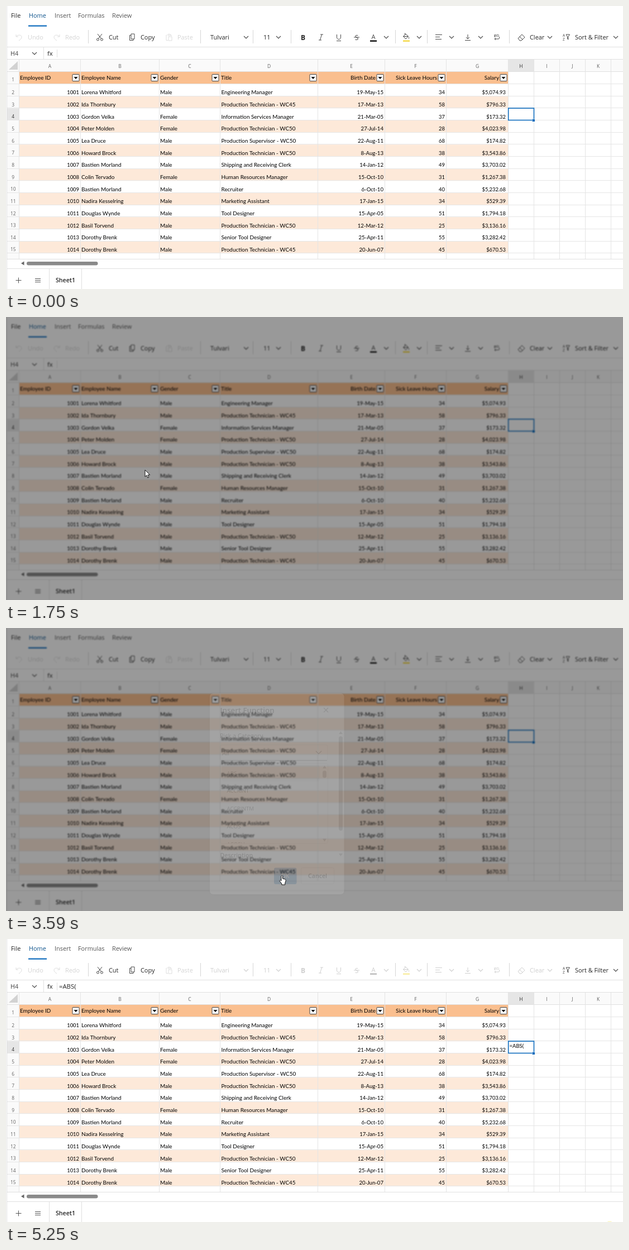
An HTML page with a canvas that plays this animation: 1105 px wide and 507 px high, repeating every 5320 ms.

```html
<!DOCTYPE html>
<html lang="en">
<head>
<meta charset="utf-8">
<title>Insert function</title>
<style>
html, body { margin: 0; width: 100%; height: 100%; overflow: hidden; background: #fff; }
canvas { display: block; }
</style>
</head>
<body>
<canvas id="stage" width="1105" height="507"></canvas>
<script>
const W = 1105, H = 507, LOOP = 5320;
const UI = '"Open Sans", "Noto Sans", sans-serif';
const CELL = 'Lato, sans-serif';
const BLUE = '#0f6cbd', INK = '#242424', GRAY = '#8a8a8a', LINE = '#e0e0e0', OFF = '#cfcfcf';

const screen = document.getElementById('stage').getContext('2d');
let c = screen;

function rect(x, y, w, h, color) {
  c.fillStyle = color;
  c.fillRect(x, y, w, h);
}
function round(x, y, w, h, r, fill, stroke) {
  c.beginPath();
  c.roundRect(x, y, w, h, r);
  if (fill) { c.fillStyle = fill; c.fill(); }
  if (stroke) { c.strokeStyle = stroke; c.lineWidth = 1; c.stroke(); }
}
function text(s, x, y, font, color = INK, align = 'left') {
  c.font = font;
  c.fillStyle = color;
  c.textAlign = align;
  c.fillText(s, x, y);
}
const ui = (s, x, y, color, size = 10.9, align) => text(s, x, y, size + 'px ' + UI, color, align);
const semi = (s, x, y, color, size = 10.6, align) => text(s, x, y, '600 ' + size + 'px ' + UI, color, align);
const cell = (s, x, y, align, size = 9.92) => text(s, x, y, size + 'px ' + CELL, '#000', align);

function icon(x, y, d, stroke, width = 1, fill) {
  const p = new Path2D(d);
  c.save();
  c.translate(x, y);
  if (fill) { c.fillStyle = fill; c.fill(p); }
  if (stroke) { c.strokeStyle = stroke; c.lineWidth = width; c.stroke(p); }
  c.restore();
}
const chevron = (x, y, color) => icon(x, y, 'M-4-2L0 2L4-2', color, 1.1);
const triangle = (x, y, up) => icon(x, y, up ? 'M-3.5 2.5H3.5L0-2.5Z' : 'M-3.5-2.5H3.5L0 2.5Z', null, 0, GRAY);

const COLS = [23, 133, 274, 383, 558, 678, 788, 899, 945, 991, 1037, 1083];
const HEADS = ['Employee ID', 'Employee Name', 'Gender', 'Title', 'Birth Date', 'Sick Leave Hours', 'Salary'];
const TECH = 'Production Technician - WC';
const STAFF = [
  'Lorena Whitford|Male|Engineering Manager|19-May-15|34|$5,074.93',
  'Ida Thornbury|Male|' + TECH + '45|17-Mar-13|58|$796.33',
  'Gordon Velka|Female|Information Services Manager|21-Mar-05|37|$173.32',
  'Peter Molden|Female|' + TECH + '50|27-Jul-14|28|$4,023.98',
  'Lea Druce|Male|Production Supervisor - WC50|22-Aug-11|68|$174.82',
  'Howard Brock|Male|' + TECH + '50|8-Aug-13|38|$3,543.86',
  'Bastien Morland|Male|Shipping and Receiving Clerk|14-Jan-12|49|$3,703.02',
  'Colin Tervado|Female|Human Resources Manager|15-Oct-10|31|$1,267.38',
  'Bastien Morland|Male|Recruiter|6-Oct-10|40|$5,232.68',
  'Nadira Kesselring|Male|Marketing Assistant|17-Jan-15|34|$529.39',
  'Douglas Wynde|Male|Tool Designer|15-Apr-05|51|$1,794.18',
  'Basil Torvend|Male|' + TECH + '50|12-Mar-12|25|$3,136.16',
  'Dorothy Brenk|Male|Senior Tool Designer|25-Apr-11|55|$3,282.42',
  'Dorothy Brenk|Male|' + TECH + '45|20-Jun-07|45|$670.53'
].map(s => s.split('|'));
const rowEnd = r => 205 + (r - 4) * 21.65;

function drawRibbon(editing) {
  ui('File', 9, 21, INK);
  ui('Home', 41, 21, '#0f548c');
  ui('Insert', 87, 21, '#555');
  ui('Formulas', 129, 21, '#555');
  ui('Review', 190, 21, '#555');
  rect(40, 34.5, 33, 2.2, BLUE);

  const on = '#484848', mid = editing ? OFF : on, ink = editing ? OFF : INK;
  icon(23, 56, 'M-5-5V-1H-1M-5-1C-2-5 5-5 5 0C5 2 3 4 0 6', '#dedede');
  ui('Undo', 39, 60, '#d4d4d4');
  icon(91, 56, 'M5-5V-1H1M5-1C2-5-5-5-5 0C-5 2-3 4 0 6', '#dedede');
  ui('Redo', 106, 60, '#d4d4d4');
  icon(168, 56, 'M-4-6L3 3M4-6L-3 3M-1.5 4a2 2 0 1 1-4 0a2 2 0 1 1 4 0M5.5 4a2 2 0 1 1-4 0a2 2 0 1 1 4 0', on);
  ui('Cut', 184, 60);
  icon(226, 56, 'M-2-6H4V3H-2ZM-2-3.5H-4.5V5.5H2V3', on);
  ui('Copy', 241, 60);
  icon(292, 56, 'M-4-4H-5V5.5H-2M-2-5.5H2V-3H-2ZM2-4H4V-2M-1-1H5V6H-1Z', '#dedede');
  ui('Paste', 307, 60, '#d4d4d4');
  ui('Tulvari', 366, 60, ink);
  ui('11', 461, 60, ink);
  text('B', 532, 60.5, '700 12px ' + UI, ink, 'center');
  icon(564, 56, 'M-1-5H4M-4 5H1M1.5-5L-1.5 5', mid);
  icon(596, 56, 'M-3.5-5V0C-3.5 5 3.5 5 3.5 0V-5M-4 6.5H4', mid);
  ui('S', 628, 60.5, mid, 12, 'center');
  rect(623, 55.5, 10, 1, mid);
  ui('A', 658, 59, mid, 11, 'center');
  rect(652, 61.5, 12, 2.3, editing ? '#b8b8b8' : '#000');
  icon(716, 54.5, 'M-4.5 0L0-4.5L4.5 0L0 4.5ZM-1.5-6V-3M-4.5 0H4.5M5.5 1.5V4', mid);
  rect(711, 61.5, 12, 2.3, editing ? '#f8ec9a' : '#f3d63b');
  icon(775, 56, 'M-6-4.5H6M-6-.5H2M-6 3.5H5', mid);
  icon(827, 56, 'M0-5V3M-3 0L0 3L3 0M-5 5.5H5', mid);
  ui('ab', 875, 55, mid, 7);
  icon(879, 56, 'M-4-5V0M-4 3H3C5 3 5 0 4-1M-2 1L-4 3L-2 5', mid);
  icon(923, 56, 'M-6 2L1-5L6 0L0 6H-3ZM-3-1L2 4', mid);
  ui('Clear', 938, 60, ink);
  ui('A', 997, 55, on, 6.5);
  ui('Z', 997, 61.5, on, 6.5);
  icon(1003, 56, 'M0-5H6.5L4-1V4L2.5 3V-1Z', on);
  ui('Sort & Filter', 1019, 60);
  for (const x of [430, 488, 681, 740, 798, 850, 974]) chevron(x, 56, mid);
  chevron(1092, 56, on);
  for (const x of [147, 348, 442, 510, 697, 754, 901]) rect(x, 43, 1, 24, '#d6d6d6');

  rect(2, 73, W, 1, LINE);
  ui('H4', 8, 89, '#424242', 10.7);
  chevron(51, 85, on);
  rect(67, 74, 1, 21, LINE);
  ui('fx', 74, 89, INK, 11.3);
  rect(91, 78, 1, 14, LINE);
  if (editing) ui('=ABS(', 95, 89, INK, 11.3);
}

function drawGrid(editing) {
  rect(2, 95, W, 22, '#fafafa');
  rect(2, 95, 21, 358, '#fafafa');
  rect(899, 96, 46, 21, '#e6e6e6');
  rect(2, rowEnd(3), 21, 21.6, '#e6e6e6');
  icon(21, 114, 'M0 0H-16L0-15Z', null, 0, '#d2d2d2');
  rect(23, 117, 876, rowEnd(1) - 117, '#fabf8f');
  for (let r = 3; r < 16; r += 2) rect(23, rowEnd(r - 1), 876, 21.65, '#fde9d9');

  rect(2, 95, W, 1, LINE);
  rect(2, 117, W, 1, LINE);
  for (let r = 1; r < 16; r++) rect(2, Math.round(rowEnd(r)) - 1, W, 1, '#e6e6e6');
  COLS.forEach((x, i) => {
    rect(x, 96, 1, 357, '#e4e4e4');
    if (i < 11) ui('ABCDEFGHIJK'[i], (x + COLS[i + 1]) / 2 + .5, 111, i === 7 ? '#333' : '#616161', 8.5, 'center');
  });
  for (let r = 1; r < 16; r++) {
    ui(String(r), 12.7, r === 1 ? 135 : rowEnd(r) - 3.7, r === 4 ? '#333' : '#616161', 8.4, 'center');
  }

  HEADS.forEach((s, i) => {
    const end = COLS[i + 1] - 8;
    if (i < 4) cell(s, COLS[i] + 2, 132, 'left');
    else cell(s, end - 8, 132, 'right');
    round(end - 6, 122.5, 12, 12, 1, '#fff', '#444');
    icon(end, 129, 'M-3.5-2H3.5L0 2Z', null, 0, '#000');
  });
  STAFF.forEach(([name, sex, job, born, hours, pay], i) => {
    const y = rowEnd(i + 2) - 3.3;
    cell(1001 + i, 131, y, 'right', 9.4);
    cell(name, 135, y, 'left');
    cell(sex, 276, y, 'left');
    cell(job, 385.5, y, 'left');
    cell(born, 676, y, 'right', 9.6);
    cell(hours, 786, y, 'right', 9.4);
    cell(pay, 895, y, 'right', 9.4);
  });

  c.strokeStyle = BLUE;
  c.lineWidth = 1.6;
  c.strokeRect(899.7, 183.1, 45.8, 21.4);
  rect(942, 202, 5, 5, '#fff');
  rect(942.6, 202.6, 4.4, 4.4, BLUE);
  if (editing) cell('=ABS(', 901.5, 195, 'left', 9.5);
}

function drawFooter() {
  rect(2, 453, W, 60, '#fff');
  rect(2, 453, W, 1, LINE);
  icon(30, 461, 'M2.5-3.5V3.5L-3 0Z', null, 0, '#666');
  round(37, 458, 127.5, 6.5, 3.2, GRAY);
  rect(2, 470, W, 1, LINE);
  rect(77, 471, 1, 36, LINE);
  rect(135, 471, 1, 36, LINE);
  icon(22.5, 491.5, 'M-5 0H5M0-5V5', '#555');
  icon(57, 492, 'M-5-3.5H5M-5-.5H5M-5 2.5H5', '#555');
  semi('Sheet1', 89, 495);
}

// Paints on an offscreen canvas, so that the result can be reused or faded as one.
function layer(paint) {
  const canvas = document.createElement('canvas');
  canvas.width = W;
  canvas.height = H;
  c = canvas.getContext('2d');
  paint();
  c = screen;
  return canvas;
}
const sheet = editing => layer(() => {
  rect(0, 0, W, H, '#fff');
  drawRibbon(editing);
  drawGrid(editing);
  drawFooter();
  rect(1, 0, 1, H, LINE);
});
const idle = sheet(false);
const edited = sheet(true);
const dimmed = layer(() => {
  rect(0, 0, W, H, '#fff');
  c.filter = 'blur(1.15px)';
  c.drawImage(idle, 0, 0);
  c.filter = 'none';
  rect(0, 0, W, H, 'rgba(0,0,0,.4)');
});

const ITEMS = ['ABS', 'ACCRINT', 'ACCRINTM', 'ACOS', 'ACOSH'];
const itemTop = i => 245.5 + i * 31.8;
const inside = (p, x, y, w, h) => p && p[0] >= x && p[0] < x + w && p[1] >= y && p[1] < y + h;

function drawDialog(chosen, pointer) {
  c.shadowColor = 'rgba(0,0,0,.16)';
  c.shadowBlur = 8;
  round(365, 117, 240.5, 360, 6, '#fafafa');
  c.shadowColor = 'transparent';
  semi('Insert Function', 383.5, 152, INK, 13.3);
  icon(573, 147, 'M-4-4L4 4M4-4L-4 4', '#555', 1.1);
  ui('Pick a Category', 383, 197);
  round(383.5, 209.5, 192.5, 28, 3, '#fff', '#d6d6d6');
  rect(385, 236.7, 190, 1, '#616161');
  ui('All', 387, 227.5);
  icon(560, 223, 'M-5-2.5L0 2.5L5-2.5', '#555', 1.1);

  round(383.5, 242.5, 193, 143.5, 3, '#fcfcfc', '#d6d6d6');
  c.save();
  c.beginPath();
  c.rect(384, 243, 192, 142.5);
  c.clip();
  ITEMS.forEach((s, i) => {
    const y = itemTop(i);
    const hover = inside(pointer, 387, y, 175, 29);
    if (chosen && i === 0) round(387, y, 175, 29, 3, '#e3e3e3');
    else if (hover) round(387, y, 175, 29, 3, '#f0f0f0');
    ui(s, 395.5, y + 18, INK, 9.8);
  });
  c.restore();
  triangle(570.5, 249, true);
  round(567, 255.5, 7, 13, 3.5, GRAY);
  triangle(570.5, 380);

  c.save();
  c.beginPath();
  c.rect(380, 395, 200, 16);
  c.clip();
  semi('Description', 383.5, 411);
  c.restore();
  triangle(599.5, 187.5, true);
  round(596, 194, 7, chosen ? 169 : 192.5, 3.5, GRAY);
  triangle(599.5, 406.5);

  if (chosen) round(480, 429.5, 40.5, 29.5, 3, BLUE);
  semi('OK', 500, 448, chosen ? '#fff' : '#c4c0ba', 10.6, 'center');
  round(528.5, 429.5, 59, 29, 3, '#fff', '#d1d1d1');
  semi('Cancel', 558, 448, INK, 10.6, 'center');
}

// Pointer route: time, x, y.
const ROUTE = [
  [0, 1085, 512], [120, 1041, 461], [600, 777, 190], [1070, 72, 49], [1150, 76, 64],
  [1290, 79, 85], [1430, 80, 87], [1750, 249, 274], [1885, 244, 323],
  [2150, 604, 330], [2410, 480, 242], [2620, 389, 256], [2760, 400, 262], [2960, 478, 377],
  [3200, 497, 442], [3450, 498, 444], [3652, 493, 444], [4050, 581, 446], [4560, 760, 520]
];
// Speed at a point; zero where the direction turns, so that the route never overshoots.
function speed(i, axis) {
  const [p, q, r] = [ROUTE[i - 1], ROUTE[i], ROUTE[i + 1]];
  if (!p || !r) return 0;
  const a = (q[axis] - p[axis]) / (q[0] - p[0]), b = (r[axis] - q[axis]) / (r[0] - q[0]);
  return a * b > 0 ? 2 * a * b / (a + b) : 0;
}
function pointerAt(t) {
  const i = ROUTE.findIndex(p => p[0] > t);
  if (i < 1) return null;
  const p = ROUTE[i - 1], q = ROUTE[i], span = q[0] - p[0], k = (t - p[0]) / span;
  const ease = k * k * (3 - 2 * k);
  return [1, 2].map(axis => p[axis] + (q[axis] - p[axis]) * ease +
    span * k * (1 - k) * (speed(i - 1, axis) * (1 - k) - speed(i, axis) * k));
}

const SHAPES = {
  arrow: 'M0 0V12.2L2.9 9.6L4.8 14L6.8 13.1L4.9 8.9H8.8Z',
  cross: 'M-1.6-5.5H1.6V-1.6H5.5V1.6H1.6V5.5H-1.6V1.6H-5.5V-1.6H-1.6Z',
  hand: 'M-1.3 9V1C-1.3-1 1.3-1 1.3 1V5L5.5 6C7 6.5 7 8 6.6 10L5.5 13V16H-.5V14L-4 9.5C-4.5 8-3 7-2.2 8Z'
};
function drawPointer(p, modal, chosen) {
  let kind = 'arrow';
  if (modal) {
    const link = inside(p, 387, 245, 175, 141) || inside(p, 528, 429, 59, 30) ||
      chosen && inside(p, 480, 429, 41, 30);
    if (link) kind = 'hand';
  } else if (inside(p, 24, 118, W, 335)) kind = 'cross';
  icon(p[0], p[1], SHAPES[kind], '#111', 1, '#fff');
}

// The picture advances in short bursts of steps: first, last, count.
const BURSTS = [
  [120, 600, 8], [670, 1150, 8], [1220, 1750, 8], [1820, 2340, 9], [2410, 2900, 7],
  [2960, 3450, 7], [3520, 4050, 9], [4120, 4590, 8], [5120, 5250, 2]
];
function snap(t) {
  let s = 0;
  for (const [a, b, n] of BURSTS) {
    for (let i = 0; i < n; i++) {
      const step = a + (b - a) * i / (n - 1);
      if (step <= t + 8) s = step;
    }
  }
  return s;
}

const clamp = v => Math.max(0, Math.min(1, v));

function draw(t) {
  const modal = t >= 1745 && t < 3640, editing = t >= 3640, chosen = t >= 2890;
  c.drawImage(modal ? dimmed : editing ? edited : idle, 0, 0);
  const p = pointerAt(t);
  if (modal) {
    const fade = Math.min(clamp((t - 1760) / 155), clamp((3600 - t) / 130));
    const dialog = layer(() => drawDialog(chosen, pointerAt(t - 25)));
    c.globalAlpha = fade;
    c.drawImage(dialog, 0, 0);
    c.globalAlpha = 1;
  }
  if (editing && Math.floor((t - 3528) / 530) % 2 === 0) rect(926, 185, 1, 12, '#000');
  if (p) drawPointer(p, modal, chosen);
  if (t > 5200) round(1077, 505.5, 8, 4, 2, '#fdf7c4');
}

let shown = -1;
const start = performance.now();
function tick() {
  const t = snap((performance.now() - start) % LOOP);
  if (t !== shown) draw(shown = t);
  requestAnimationFrame(tick);
}
tick();
</script>
</body>
</html>
```
